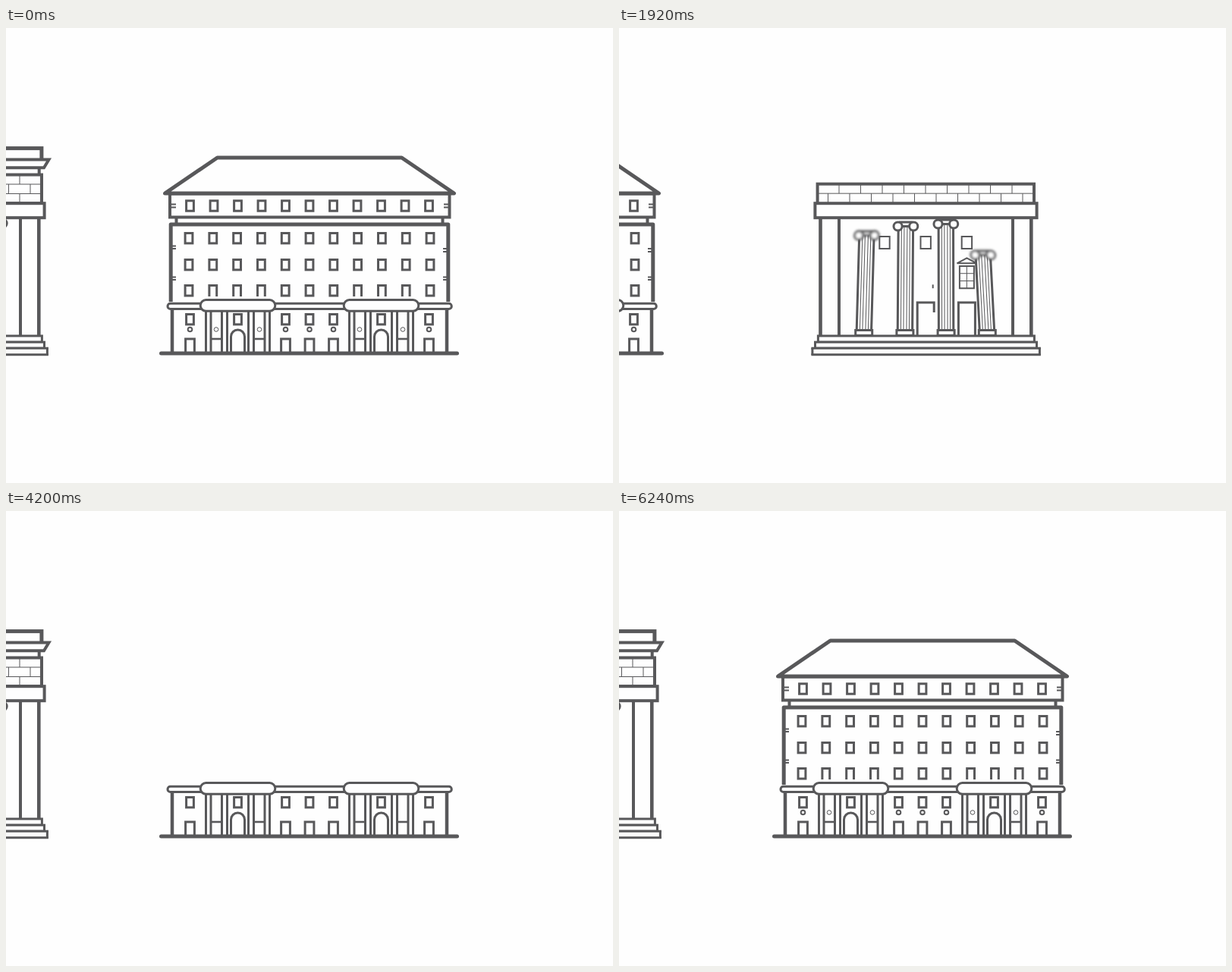
Write an HTML page that moves like this. It is 800 px wide and 600 px high and loops after 6480 ms.

```html
<!DOCTYPE html>
<html lang="en">
<head>
<meta charset="utf-8">
<title>Buildings</title>
<style>
  html, body { margin: 0; width: 100%; height: 100%; overflow: hidden; background: #fefefe; }
  svg { display: block; width: 100vw; height: 100vh; }
</style>
</head>
<body>
<svg viewBox="0 0 800 600">
  <defs id="defs"></defs>
  <g id="scene" fill="#fefefe" stroke="#58585a"></g>
</svg>
<script>
const LOOP = 6480, STEP = 40, SLIDE = 725, INK = '#58585a';
const HOUSE_X = 399.7, TEMPLE_X = 404.6;
const scene = document.getElementById('scene');

document.getElementById('defs').innerHTML =
  '<filter id="soft" x="-50%" y="-50%" width="200%" height="200%"><feGaussianBlur stdDeviation="1.7"/></filter>' +
  [173, 193, 231, 259, 362, 429].map(y =>
    `<clipPath id="above${y}"><rect x="-100" y="-100" width="1000" height="${y + 100}"/></clipPath>`).join('');

// Timing
const part = (t, start, length) => Math.min(1, Math.max(0, (t - start) / length));
const easeOut = p => 1 - (1 - p) ** 3;
const easeInOut = p => p < .5 ? 4 * p ** 3 : 1 - 4 * (1 - p) ** 3;
const out = (t, start, length) => easeOut(part(t, start, length));

// Drawing
const path = (d, w, extra = '') => `<path d="${d}" fill="none" stroke-width="${w}" ${extra}/>`;
const rect = (x, y, w, h, s, extra = '') =>
  `<rect x="${x}" y="${y}" width="${w}" height="${h}" stroke-width="${s}" ${extra}/>`;
const circle = (x, y, r, w) => `<circle cx="${x}" cy="${y}" r="${r}" stroke-width="${w}"/>`;
const move = (x, y, body, more = '') => `<g transform="translate(${x} ${y}) ${more}">${body}</g>`;
const pop = (x, y, s, body) => s > 0 ? move(x, y, body, `scale(${s})`) : '';
const trace = (d, w, p) => p > 0 ? path(d, w, `pathLength="1" stroke-dasharray="${p} 2"`) : '';
const rise = (p, distance, edge, body) => p > 0
  ? `<g clip-path="url(#above${edge})">${move(0, distance * (1 - p), body)}</g>` : '';
const widen = (p, centre, body) => p > 0 ? move(centre, 0, body, `scale(${p} 1) translate(${-centre} 0)`) : '';
const times = (n, fn) => Array.from({ length: n }, (_, i) => fn(i)).join('');
const each = (list, fn) => list.map(fn).join('');

// Wide house
const pane = rect(-4.9, -6.7, 9.8, 13.4, 3);
const bay = i => 242.5 + 31.5 * i;
const wallBay = i => 241 + 31.8 * i;
const PLAIN_BAYS = [0, 4, 5, 6, 10];
const PORCHES = [305.5, 494.5];

function lowWindow(t, i) {
  const p = part(t, 5196 + 64 * i, 384), s = easeOut(p);
  if (!p) return '';
  if (s < .85) {
    const w = 11 * s, h = 15.5 * s;
    return rect(wallBay(i) - w / 2, 346 - h / 2, w, h, 0, `fill="${INK}" stroke="none"`);
  }
  const open = i % 6 > 0 && i % 6 < 4;
  const d = open ? 'M-4.9 8V-6.5H4.9V8' : 'M-4.9 -6.5H4.9V6.9H-4.9Z';
  return move(wallBay(i), 346, path(d, 3 * p ** .8));
}

function porchColumns(x) {
  return each([-1, 1], side => {
    const at = d => x + side * d;
    return path(each([42, 35.5, 21, 14], d => `M${at(d)} 373V429`), 3) +
      path(`M${at(35.5)} 410H${at(21)}`, 2.6);
  });
}

function roof(t) {
  if (t < 5510) return '';
  const left = 1 - out(t, 5505, 600);
  return move(400, 218 - 141 * left,
    '<path d="M-190.5 0L-121.5 -47H121.5L190.5 0Z" stroke-width="5" stroke-linejoin="round"/>',
    `rotate(${7.4 * left})`);
}

function topFloor(t) {
  return rise(out(t, 4620, 160), 10, 259, path('M224.5 249V260M575.5 249V260', 4)) +
    rise(out(t, 4920, 1170), 42, 259,
      rect(216, 218.5, 368.5, 31, 4) +
      path('M217 232.5H224M217 236.5H224M577 232.5H584M577 236.5H584', 2) +
      times(11, i => pop(bay(i), 234.5, out(t, 4695 + 130 * i, 235), pane)));
}

function upperWall(t) {
  return rise(out(t, 4210, 480), 104, 362,
    rect(217, 259, 366, 103, 0, 'stroke="none"') +
    path('M217.2 361V259H582.8V361', 5, 'stroke-linejoin="round"') +
    path('M218 287.5H224M218 291H224M218 328.5H224M218 332H224' +
         'M576 291H582M576 295H582M576 328.5H582M576 332H582', 2)) +
    times(11, i =>
      pop(wallBay(i), 277.2, out(t, 4500 + 60 * i, 300), pane) +
      pop(wallBay(i), 312.2, out(t, 4650 + 60 * i, 300), pane) +
      lowWindow(t, i));
}

function groundFloor(t) {
  const lamp = i => out(t, 4880 + 40 * i, 200);
  return rise(out(t, 3660, 340), 58, 429,
      path('M219 371V429M581 371V429', 4.5) + each(PORCHES, porchColumns)) +
    widen(out(t, 3840, 310), HOUSE_X, rect(213, 363.3, 374.3, 7.2, 3, 'rx="3.6"')) +
    each(PORCHES, (x, i) => pop(x, 366, out(t, 3880 + 50 * i, 260),
      rect(-49.3, -7.4, 98.6, 14.7, 3, 'rx="7.3"'))) +
    each([0, 2, 4, 5, 6, 8, 10], i => pop(bay(i), 384.2, out(t, 3920 + 12 * i, 150), pane)) +
    each(PLAIN_BAYS, i => pop(bay(i), 429, out(t, 3930 + 12 * i, 150), path('M-5.9 0V-19H5.9V0', 3)) +
      pop(bay(i), 397.5, lamp(i), circle(0, 0, 2.8, 2))) +
    each(PORCHES, (x, i) => pop(x, 429, out(t, 3940 + 50 * i, 200),
      path('M-9 0V-22A9 9 0 0 1 9 -22V0', 3)) +
      each([-28.5, 28.5], d => pop(x + d, 397.5, lamp(3 + 4 * i), circle(0, 0, 2.8, 1)))) +
    widen(out(t, 3520, 180), HOUSE_X, path('M204.5 429H594.5', 5, 'stroke-linecap="round"'));
}

const house = t => topFloor(t) + roof(t) + upperWall(t) + groundFloor(t);

// Temple
const bayCentre = i => 350 + 54.2 * i;

function bottomStep(t) {
  const side = 1 + 2 * part(t, 600, 80), a = 254.9, b = 554.4;
  return widen(out(t, 470, 170), TEMPLE_X,
    rect(a, 422.3, b - a, 8.5, 0, 'stroke="none"') +
    path(`M${a - side / 2} 422.3H${b + side / 2}M${a - side / 2} 430.8H${b + side / 2}`, 3) +
    path(`M${a} 422V431M${b} 422V431`, side));
}

function column(t, i) {
  const p = out(t, [1606, 1500, 1434, 1714][i], 600);
  if (!p) return '';
  const drop = 148 * (1 - p), top = Math.min(-8, drop - 148);
  const lean = (i < 2 ? -1 : 1) * Math.min(3, .1 * drop);
  const capital = path(`M-9 ${top - 5.5}H9M-6 ${top}H6`, 3) +
    circle(-10.3, top, 5.6, 3) + circle(10.3, top, 5.6, 3);
  const shaft = rect(-9.7, top, 19.4, -top, 0, 'stroke="none"') +
    path(`M-9.7 ${top}V-6M9.7 ${top}V-6`, 3) +
    path(each([-5.5, -2, 2, 5.5], x => `M${x} ${top}V-6`), 1);
  return move(322.7 + 54.2 * i, 405.5,
    `<g transform="skewX(${lean})">${shaft}<g ${drop > 8 ? 'filter="url(#soft)"' : ''}>${capital}</g></g>` +
    rect(-11, -7, 22, 7, 3));
}

function opening(t, i) {
  const order = 2 - i;
  const glass = part(t, 1660 + 248 * order, 240), bars = part(glass, .6, .4);
  return move(bayCentre(i), 0,
    trace('M6.7 291V275H-6.7V291Z', 2, part(t, 1350 + 90 * order, 260)) +
    trace('M9.5 343.2V314H-9.5V343.2Z', 2, glass) +
    trace('M-13 310.3L0 303.3L13 310.3Z', 2, part(glass, .3, .7)) +
    trace('M0 343V314', 1, bars) + trace('M-9 323.7H9', 1, bars) + trace('M-9 333.5H9', 1, bars) +
    trace('M-11 406V362H11V406', 3, part(t, 1585 + 170 * order, 230)));
}

function bricks() {
  const joints = (x, n, y) => times(n, k => `M${x + 28.5 * k} ${y}v12.5`);
  return rect(261.6, 193.5, 285.4, 37.5, 4) +
    path('M262 206H547M262 218.5H547' + joints(290, 9, 193.5) +
      joints(275.5, 10, 206) + joints(290, 9, 218.5), 1);
}

function temple(t) {
  const height = 156 * out(t, 880, 400);
  return rise(out(t, 2580, 370), 18, 173, rect(261.3, 158.6, 285.6, 20, 5)) +
    rise(out(t, 2150, 500), 22, 193,
      path('M265 184V194M543.7 184V194', 4) +
      '<path d="M252 173.5H556.5L550 184.2H258.3Z" stroke-width="4"/>') +
    rise(out(t, 1730, 580), 40, 231, bricks()) +
    (height ? path(`M265.5 406v${-height}M543.3 406v${-height}`, 4.6) +
      path(`M290 406v${-height}M519 406v${-height}`, 4) : '') +
    times(3, i => opening(t, i)) +
    times(4, i => column(t, i)) +
    widen(out(t, 1180, 320), TEMPLE_X, rect(258.4, 231.2, 292.2, 19, 4)) +
    widen(out(t, 780, 160), TEMPLE_X, rect(262.4, 406, 285, 8.2, 3)) +
    widen(out(t, 680, 160), TEMPLE_X, rect(258.5, 414.2, 292, 8, 3)) +
    bottomStep(t);
}

function draw(t) {
  const first = -538 * easeInOut(part(t, 0, SLIDE));
  const second = -500 * easeInOut(part(t, 2981, SLIDE));
  const parts = [
    [first - 500, temple, Infinity],
    [first + second, house, Infinity],
    [first + second + 538, temple, t],
    [second + 500, house, t]
  ];
  // Buildings that have left the stage are skipped.
  scene.innerHTML = each(parts, ([x, build, clock]) => x > -620 ? move(x, 0, build(clock)) : '');
}

const began = performance.now();
let shown = -1;
function tick() {
  const t = Math.floor((performance.now() - began) % LOOP / STEP) * STEP;
  if (t !== shown) draw(shown = t);
  requestAnimationFrame(tick);
}
tick();
</script>
</body>
</html>
```
